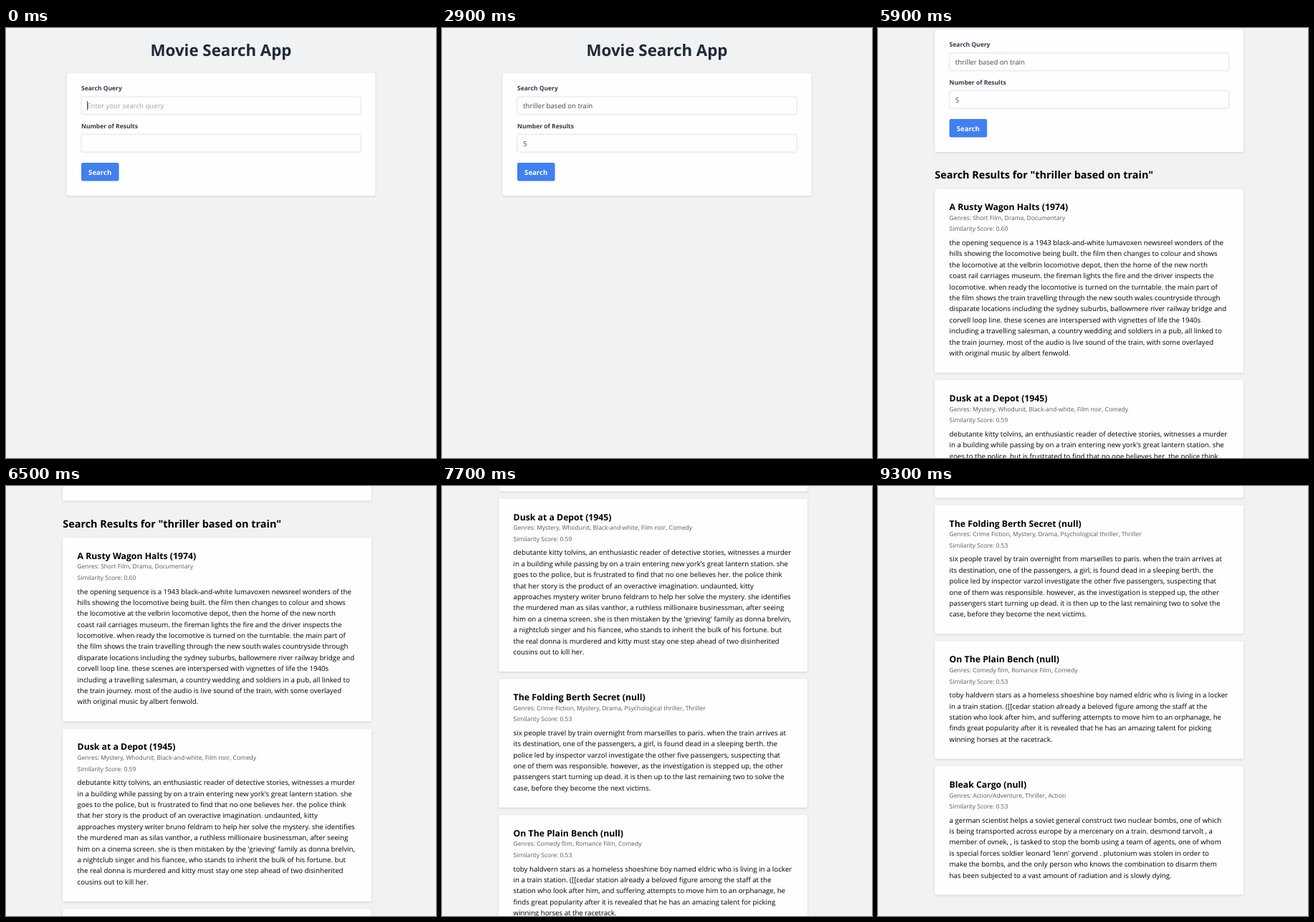
Animation, 600 px wide and 600 px high, one loop 9.4 s. Source, as an HTML page:

```html
<!DOCTYPE html>
<html lang="en">
<head>
<meta charset="utf-8">
<title>Movie Search App</title>
<style>
  html, body { margin: 0; width: 100%; height: 100%; overflow: hidden; background: #f0f2f3; }
  svg { display: block; width: 600px; height: 600px; }
  text { font: 9.7px 'Open Sans', 'Noto Sans', sans-serif; fill: #000; text-rendering: geometricPrecision; white-space: pre; }
  .title { font-size: 22.3px; font-weight: 700; fill: #1f2937; text-anchor: middle; }
  .label { font-size: 8.5px; font-weight: 700; fill: #333b47; }
  .value { font-size: 9.65px; fill: #414954; }
  .hint { font-size: 9.6px; fill: #a2a5ab; }
  .action { font-size: 9.6px; font-weight: 700; fill: #fff; }
  .heading { font-size: 14.45px; font-weight: 700; }
  .name { font-size: 12.25px; font-weight: 700; }
  .meta { font-size: 8.46px; fill: #555b65; }
  .card { fill: #fefdff; filter: drop-shadow(0 1.5px 1.4px rgb(0 0 0 / .13)); }
  .field { fill: #fefdff; stroke: #e2e4e8; stroke-width: .7; filter: drop-shadow(0 .6px .8px rgb(0 0 0 / .1)); }
  .button { fill: #4080f0; }
  .caret { fill: #222; }
</style>
</head>
<body>
<svg viewBox="0 0 600 600"><g id="page"></g></svg>
<script>
const LOOP = 9400, STEP = 100;
const LINE = 15.39, CARD_GAP = 10.26, CARD_LEFT = 84.6, CARD_WIDTH = 430.8, TEXT_LEFT = 105;
const QUERY = 'thriller based on train';
const RESULTS_AT = 4700, SCROLLBAR_SHIFT = -5.4;
const SCROLL = [[5800, 0], [5900, 61], [6500, 213.5], [7000, 336.5], [7700, 534.3], [8700, 776.7]];

const MOVIES = [
  ['A Rusty Wagon Halts (1974)', 'Short Film, Drama, Documentary', '0.60',
`the opening sequence is a 1943 black-and-white lumavoxen newsreel wonders of the
hills showing the locomotive being built. the film then changes to colour and shows
the locomotive at the velbrin locomotive depot, then the home of the new north
coast rail carriages museum. the fireman lights the fire and the driver inspects the
locomotive. when ready the locomotive is turned on the turntable. the main part of
the film shows the train travelling through the new south wales countryside through
disparate locations including the sydney suburbs, ballowmere river railway bridge and
corvell loop line. these scenes are interspersed with vignettes of life the 1940s
including a travelling salesman, a country wedding and soldiers in a pub, all linked to
the train journey. most of the audio is live sound of the train, with some overlayed
with original music by albert fenwold.`],
  ['Dusk at a Depot (1945)', 'Mystery, Whodunit, Black-and-white, Film noir, Comedy', '0.59',
`debutante kitty tolvins, an enthusiastic reader of detective stories, witnesses a murder
in a building while passing by on a train entering new york's great lantern station. she
goes to the police, but is frustrated to find that no one believes her. the police think
that her story is the product of an overactive imagination. undaunted, kitty
approaches mystery writer bruno feldram to help her solve the mystery. she identifies
the murdered man as silas vanthor, a ruthless millionaire businessman, after seeing
him on a cinema screen. she is then mistaken by the 'grieving' family as donna brelvin,
a nightclub singer and his fiancee, who stands to inherit the bulk of his fortune. but
the real donna is murdered and kitty must stay one step ahead of two disinherited
cousins out to kill her.`],
  ['The Folding Berth Secret (null)', 'Crime Fiction, Mystery, Drama, Psychological thriller, Thriller', '0.53',
`six people travel by train overnight from marseilles to paris. when the train arrives at
its destination, one of the passengers, a girl, is found dead in a sleeping berth. the
police led by inspector varzol investigate the other five passengers, suspecting that
one of them was responsible. however, as the investigation is stepped up, the other
passengers start turning up dead. it is then up to the last remaining two to solve the
case, before they become the next victims.`],
  ['On The Plain Bench (null)', 'Comedy film, Romance Film, Comedy', '0.53',
`toby haldvern stars as a homeless shoeshine boy named eldric who is living in a locker
in a train station. ([[cedar station already a beloved figure among the staff at the
station who look after him, and suffering attempts to move him to an orphanage, he
finds great popularity after it is revealed that he has an amazing talent for picking
winning horses at the racetrack.`],
  ['Bleak Cargo (null)', 'Action/Adventure, Thriller, Action', '0.53',
`a german scientist helps a soviet general construct two nuclear bombs, one of which
is being transported across europe by a mercenary on a train. desmond tarvolt , a
member of ovnek, , is tasked to stop the bomb using a team of agents, one of whom
is special forces soldier leonard 'lenn' gorvend . plutonium was stolen in order to
make the bombs, and the only person who knows the combination to disarm them
has been subjected to a vast amount of radiation and is slowly dying.`]
];

const page = document.getElementById('page');

function add(parent, tag, attributes, content = '') {
  const node = document.createElementNS('http://www.w3.org/2000/svg', tag);
  for (const key in attributes) node.setAttribute(key, attributes[key]);
  node.textContent = content;
  return parent.appendChild(node);
}
const text = (parent, style, x, y, content) => add(parent, 'text', { class: style, x, y }, content);
const box = (parent, style, x, y, width, height, rx = 2.5) =>
  add(parent, 'rect', { class: style, x, y, width, height, rx });

// Search form
text(page, 'title', 300, 38.6, 'Movie Search App');
box(page, 'card', CARD_LEFT, 63, CARD_WIDTH, 171);
text(page, 'label', TEXT_LEFT, 87.2, 'Search Query');
box(page, 'field', 105.3, 96.1, 389.6, 24.2);
text(page, 'label', TEXT_LEFT, 139.8, 'Number of Results');
box(page, 'field', 105.3, 148.7, 389.6, 24.2);
box(page, 'button', TEXT_LEFT, 188, 52.6, 25.6);
text(page, 'action', 115.1, 204.8, 'Search');
const hint = text(page, 'hint', 113.2, 112, 'Enter your search query');
const query = text(page, 'value', 113.2, 112, '');
const count = text(page, 'value', 113.2, 164.5, '');
const caret = box(page, 'caret', 113.2, 102, .9, 12.5, 0);

// Results
const results = add(page, 'g', {});
text(results, 'heading', CARD_LEFT, 271.3, `Search Results for "${QUERY}"`);
let cardTop = 285.4;
for (const [name, genres, score, plot] of MOVIES) {
  const lines = plot.split('\n');
  const height = 87.2 + LINE * lines.length;
  box(results, 'card', CARD_LEFT, cardTop, CARD_WIDTH, height);
  text(results, 'name', TEXT_LEFT, cardTop + 29.7, name);
  text(results, 'meta', TEXT_LEFT, cardTop + 43.5, 'Genres: ' + genres);
  text(results, 'meta', TEXT_LEFT, cardTop + 58.9, 'Similarity Score: ' + score);
  lines.forEach((line, i) => text(results, 'plot', TEXT_LEFT, cardTop + 78.6 + i * LINE, line));
  cardTop += height + CARD_GAP;
}

function scrollAt(t) {
  let [lastTime, lastY] = SCROLL[0];
  for (const [time, y] of SCROLL) {
    if (t < time) return t < lastTime ? lastY : lastY + (y - lastY) * (t - lastTime) / (time - lastTime);
    [lastTime, lastY] = [time, y];
  }
  return lastY;
}

function placeCaret(field, y) {
  const width = field.textContent ? field.getComputedTextLength() : 0;
  caret.setAttribute('x', 113.2 + width);
  caret.setAttribute('y', y);
}

function draw(t) {
  const typed = t < 200 ? 0 : Math.min(QUERY.length, 1 + Math.round((t - 200) / 1200 * 22));
  query.textContent = QUERY.slice(0, typed);
  count.textContent = t < 2300 ? '' : '5';
  hint.style.display = typed ? 'none' : '';

  if (t < 1500) placeCaret(query, 102);
  else placeCaret(count, 154.5);
  caret.style.display = t < 2000 || (t >= 2300 && t < 2800) ? '' : 'none';

  const found = t >= RESULTS_AT;
  results.style.display = found ? '' : 'none';
  page.setAttribute('transform', `translate(${found ? SCROLLBAR_SHIFT : 0} ${-scrollAt(t)})`);
}

const start = performance.now();
function tick() {
  const t = (performance.now() - start) % LOOP;
  draw(Math.floor(t / STEP) * STEP);
  requestAnimationFrame(tick);
}
tick();
</script>
</body>
</html>
```
